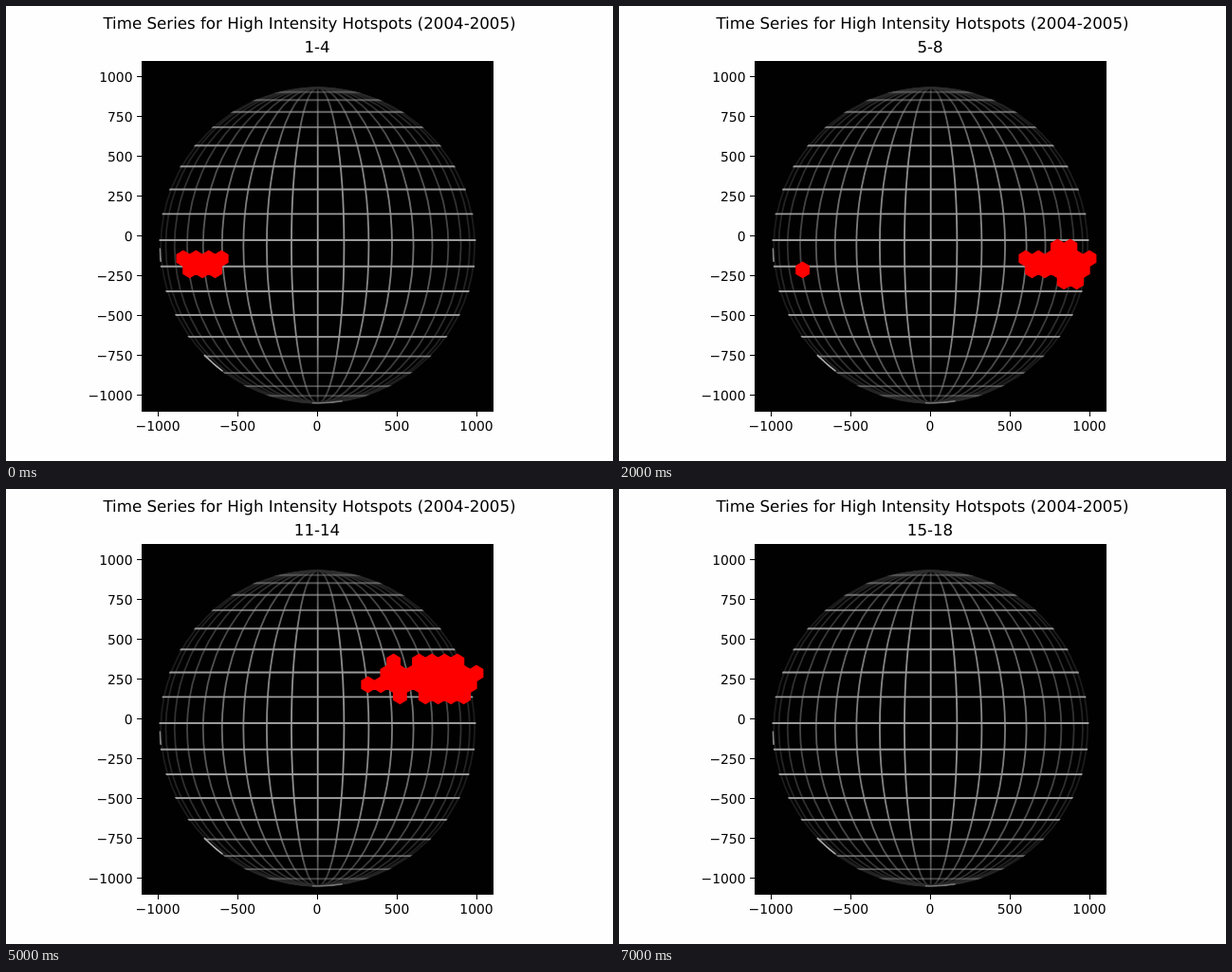
An HTML page for the animation above (8000 ms loop, 640 by 480 pixels).

```html
<!DOCTYPE html>
<html lang="en">
<head>
<meta charset="utf-8">
<title>Hotspot time series</title>
<style>
  html, body { margin: 0; width: 100%; height: 100%; overflow: hidden; background: #fefefe; }
  svg { display: block; font-family: "DejaVu Sans", sans-serif; text-rendering: geometricPrecision; }
  .title { font-size: 16.67px; text-anchor: middle; }
  .label { font-size: 13.89px; }
</style>
</head>
<body>
<svg id="stage" width="640" height="480" viewBox="0 0 640 480">
  <defs>
    <radialGradient id="fade" gradientUnits="userSpaceOnUse" cx="328.7" cy="252.5" r="167">
      <stop offset="0" stop-color="#a4a4a4"/>
      <stop offset=".6" stop-color="#8c8c8c"/>
      <stop offset=".85" stop-color="#585858"/>
      <stop offset="1" stop-color="#2a2a2a"/>
    </radialGradient>
    <clipPath id="disc"><circle cx="328.5" cy="252.5" r="167.2"/></clipPath>
  </defs>
  <text class="title" x="320" y="24">Time Series for High Intensity Hotspots (2004-2005)</text>
  <text class="title" x="328" y="49" id="days"></text>
  <rect x="143" y="58" width="371" height="370" fill="#000100"/>
  <g id="axes"></g>
  <g id="globe" fill="none" clip-path="url(#disc)"></g>
  <path id="spots" fill="#f00" stroke="#f00" stroke-width="1.39"/>
</svg>
<script>
const SCALE = 0.168;                              // pixels per plot unit
const plotX = v => 328 + v * SCALE;
const plotY = v => 242.4 - v * SCALE;
const GLOBE = { x: 328.7, y: 252.5, r: 166.5 };
const RAD = Math.PI / 180;
const $ = id => document.getElementById(id);

function add(parent, tag, attrs, text = "") {
  const el = document.createElementNS("http://www.w3.org/2000/svg", tag);
  for (const name in attrs) el.setAttribute(name, attrs[name]);
  el.textContent = text;
  $(parent).append(el);
}

function drawAxes() {
  const tick = (x, y, width, height) => add("axes", "rect", { x, y, width, height });
  const label = (value, x, y, anchor) =>
    add("axes", "text", { class: "label", x, y, "text-anchor": anchor }, String(value).replace("-", "\u2212"));
  for (let v = -1000; v <= 1000; v += 250) {
    tick(138, Math.floor(plotY(v)), 5, 1);
    label(v, 133.5, plotY(v) + 5.1, "end");
    if (v % 500 === 0) {
      tick(plotX(v), 428, 1, 5);
      label(v, plotX(v), 448, "middle");
    }
  }
}

function drawGlobe() {
  const { x, y, r } = GLOBE;
  const line = (d, stroke, width, opacity = 1) =>
    add("globe", "path", { d, stroke, "stroke-width": width, opacity });
  const angle = n => (9.24 * n + 0.35 * Math.sign(n)) * RAD;

  for (let n = -9; n <= 9; n++) {
    const rx = r * Math.abs(Math.sin(angle(n)));
    const curve = n ? `A${rx} ${r} 0 0 ${n > 0 ? 1 : 0} ` : "L";
    line(`M${x} ${y - r}${curve}${x} ${y + r}`, "url(#fade)", 1.8, 1 - Math.abs(n) * 0.045);
  }

  // parallels, seen from slightly off the equator
  for (let n = -8; n <= 8; n++) {
    const h = Math.sin(angle(n));
    line(`M160 ${y + r * h - 5.5 * Math.cos(angle(n))}h337`, "#9c9c9c", 1.9, 1 - 0.7 * h ** 4);
  }

  // brighter stretches of the limb
  const limb = (from, to, stroke) => {
    const point = deg => `${x + r * Math.cos(deg * RAD)} ${y + r * Math.sin(deg * RAD)}`;
    line(`M${point(from)}A${r} ${r} 0 0 1 ${point(to)}`, stroke, 1.7);
  };
  limb(127, 136, "#aaa");
  limb(81, 92, "#777");
  limb(174, 179, "#888");
}

// Hexagons on a grid 80 units wide; odd rows are shifted by half a cell.
const CELL = 80, ROW = 1000 / 14;

function hexagon(x, row) {
  const w = CELL / 2 * SCALE, h = ROW / 3 * SCALE;
  return `M${plotX(x)} ${plotY(row * ROW - 1000) - 2 * h}` +
    `l${w} ${h}v${2 * h}l${-w} ${h}l${-w} ${-h}v${-2 * h}z`;
}

// All cells whose centres lie between left and right, in the given rows.
function block(left, right, bottom, top = bottom) {
  let d = "";
  for (let row = bottom; row <= top; row++)
    for (let x = -1000 + row % 2 * CELL / 2; x <= right; x += CELL)
      if (x >= left) d += hexagon(x, row);
  return d;
}

const spots = [
  block(-840, -600, 11, 12),
  block(840, 1000, 12),
  block(-800, -800, 11) + block(600, 1000, 11, 12) + block(800, 920, 10, 13),
  "",
  block(520, 760, 16),
  block(320, 960, 17) + block(440, 1000, 18) + block(480, 520, 16, 19) + block(640, 920, 16, 19),
  block(200, 1000, 18) + block(320, 880, 19) + block(640, 960, 17) + block(240, 240, 17) + block(480, 480, 17),
  ""
];
let shown = -1;

function render(now) {
  const step = Math.floor(now / 1000) % spots.length;
  if (step !== shown) {
    shown = step;
    $("days").textContent = `${2 * step + 1}-${2 * step + 4}`;
    $("spots").setAttribute("d", spots[step]);
  }
  requestAnimationFrame(render);
}

drawAxes();
drawGlobe();
render(0);
</script>
</body>
</html>
```
